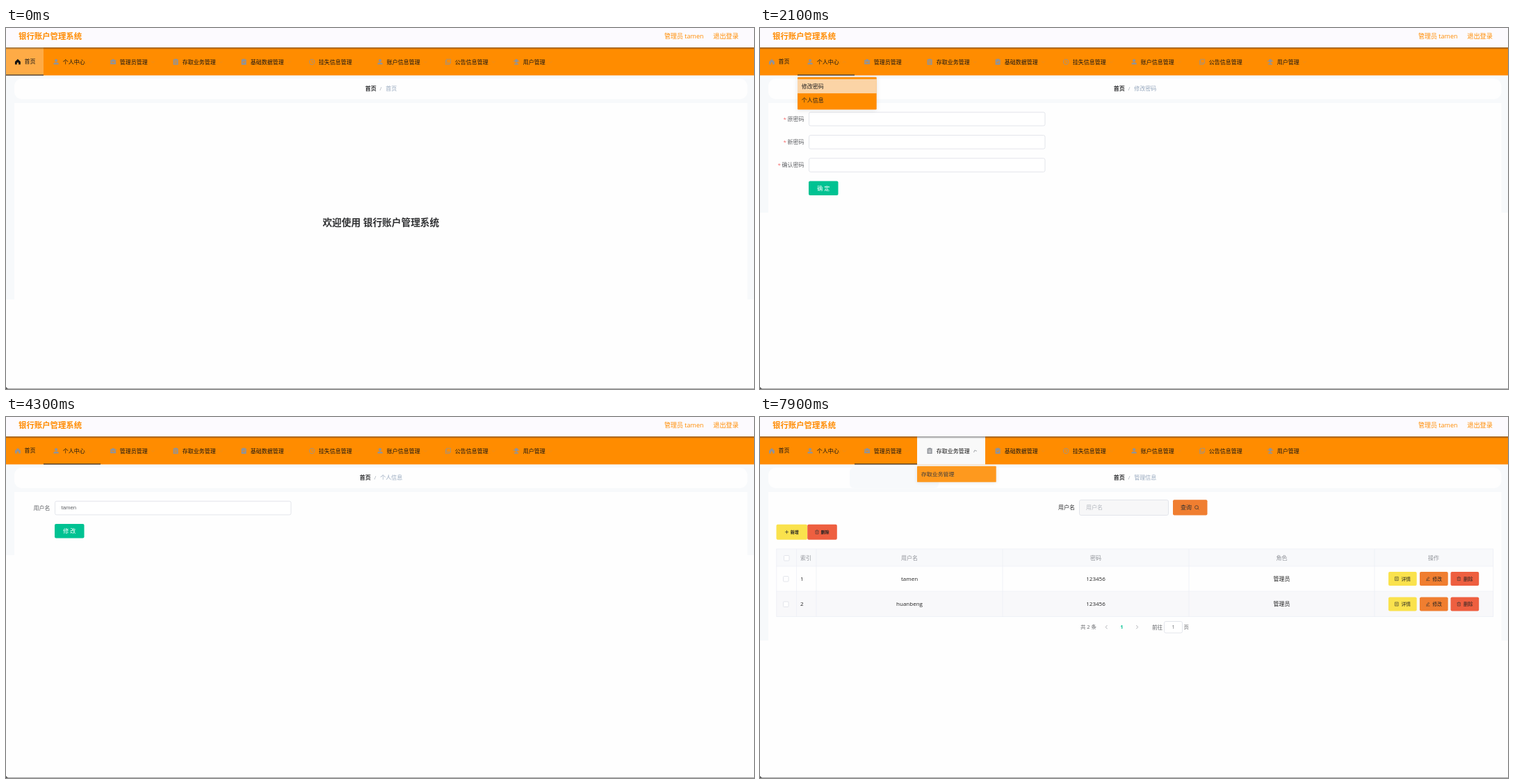
Write an HTML page that moves like this. It is 1076 px wide and 520 px high and loops after 8000 ms.

```html
<!DOCTYPE html>
<html lang="zh">
<head>
<meta charset="utf-8">
<style>
html, body { margin: 0; width: 100%; height: 100%; overflow: hidden; background: #fefefe; }
svg { display: block; width: 100%; height: 100%; }
text { font-family: "Open Sans", "Noto Sans CJK SC", "Noto Sans CJK", sans-serif; white-space: pre; }
</style>
</head>
<body>
<svg id="stage" viewBox="0 0 1076 520"></svg>
<script>
const LOOP = 8000, STEP = 100;
const ORANGE = '#ff8c00', GREEN = '#00c292', GREY = '#909399', LINE = '#dcdfe6', PALE = '#f8f9fb';
const YELLOW = '#fae24d', AMBER = '#f07e30', RED = '#ee5f40';
const USER = 'tamen', STAFF = 'huanbeng';

const clamp = v => Math.max(0, Math.min(1, v));
// rises from a over d ms, falls from b over e ms
const fade = (t, a, b, d = 300, e = d) => clamp(Math.min((t - a) / d, 1 - (t - b) / e));

const rect = (x, y, w, h, fill, r = 0, more = '') =>
  `<rect x="${x}" y="${y}" width="${w}" height="${h}" rx="${r}" fill="${fill}" ${more}/>`;
const box = (x, y, w, h, r = 2.3, fill = '#fff', line = LINE) =>
  rect(x + .5, y + .5, w - 1, h - 1, fill, r, `stroke="${line}" stroke-width=".8"`);
const stroke = (d, color, w = .8, more = '') =>
  `<path d="${d}" fill="none" stroke="${color}" stroke-width="${w}" ${more}/>`;
// y is the middle of the line
const text = (x, y, s, fill = '#606266', size = 8, anchor = 'start', more = '') =>
  `<text x="${x}" y="${y + size * .37}" font-size="${size}" fill="${fill}" text-anchor="${anchor}" ${more}>${s}</text>`;
const mid = (x, y, s, fill, size, more) => text(x, y, s, fill, size, 'middle', more);
const button = (x, y, w, h, fill, s, r = 2) => rect(x, y, w, h, fill, r) + mid(x + w / 2, y + h / 2, s, '#fff', 8);

// icons on a 10 x 10 grid
const PERSON = 'M5 .5a2.3 2.3 0 0 1 0 4.8a2.3 2.3 0 0 1 0-4.8M.8 9.2V8Q1 6 3 6H7Q9 6 9.2 8V9.2Z';
const ICONS = {
  home: 'M5 .5L9.5 4.6V9.3H6.3V6H3.7V9.3H.5V4.6Z',
  person: PERSON,
  bag: 'M3 2.2V.8H7V2.2H9.6V5H.4V2.2ZM.4 5.6H4V6.6H6V5.6H9.6V9H.4Z',
  clip: 'M1 1H3V.2H7V1H9V9.7H1ZM2.7 3.3V4.1H7.3V3.3ZM2.7 5.3V6.1H7.3V5.3ZM2.7 7.3V8H7.3V7.3Z',
  check: 'M1 1H3V.2H7V1H9V9.7H1ZM2.8 5.2L4.6 7.2L7.6 4L7 3.4L4.6 5.9L3.4 4.6Z',
  clock: 'M5 .3a4.7 4.7 0 0 1 0 9.4a4.7 4.7 0 0 1 0-9.4M5 1.2a3.8 3.8 0 0 0 0 7.6a3.8 3.8 0 0 0 0-7.6M4.6 2.3H5.4V4.8L7.2 6L6.8 6.7L4.6 5.3Z',
  note: 'M2 .5H9.5V7.5H7.5V9.5H.5V2.5H2ZM2.8 1.3V6.7H8.7V1.3ZM1.3 3.3V8.7H6.7V7.5H2V3.3Z',
  agent: 'M2.2 2Q5-1 7.8 2V4.5Q5 8 2.2 4.5ZM.6 3H1.7V5H.6ZM8.3 3H9.4V5H8.3ZM1.4 9.4Q2 6.3 5 7Q8 6.3 8.6 9.4Z'
};
const icon = (name, x, y, fill) =>
  `<path transform="translate(${x} ${y}) scale(.88)" fill-rule="evenodd" fill="${fill}" d="${ICONS[name]}"/>`;

// label, icon, left edge, width
const MENU = [
  ['首页', 'home', 0, 54], ['个人中心', 'person', 54, 82], ['管理员管理', 'bag', 136, 90],
  ['存取业务管理', 'clip', 226, 98], ['基础数据管理', 'check', 324, 98], ['挂失信息管理', 'clock', 422, 98],
  ['账户信息管理', 'person', 520, 98], ['公告信息管理', 'note', 618, 98], ['用户管理', 'agent', 716, 82]
];

function header(t, active, hovers, opens) {
  let s = rect(0, 0, 1076, 28, '#fcfafe') +
    text(18, 12, '银行账户管理系统', ORANGE, 11.4, 'start', 'font-weight="700"') +
    text(1003.5, 12, '管理员 ' + USER, ORANGE, 9, 'end') + text(1054, 12, '退出登录', ORANGE, 9.2, 'end') +
    rect(0, 28, 1076, 40.3, ORANGE);
  MENU.forEach(([label, pic, x, w], i) => {
    const on = hovers[i] || 0, first = i === 0;
    if (on) s += rect(x, 28, w, 40.3, '#f9f9f9', 0, `opacity="${on}"`);
    s += icon(pic, x + (first ? 12.5 : 13.7), 44.4, first && active === 0 ? '#111' : GREY) +
      text(x + (first ? 26.5 : 27.7), first ? 48.2 : 49.3, label, '#161616');
    if (!first) s += stroke('M-2.4-1.2L0 1.2L2.4-1.2', GREY, .8,
      `opacity="${on ? .9 : .2}" transform="translate(${x + w - 14.7} 49) rotate(${180 * (opens[i] || 0)})"`);
    if (i === active) s += rect(x, 67.2, w, 1.2, '#303133');
  });
  [.45, .25, .1].forEach((o, i) => s += rect(0, 28 + i, 1076, 1, '#222', 0, `opacity="${o}"`));
  return s;
}

function dropdown(x, open, items) {
  if (!open) return '';
  let s = rect(0, 0, 113.7, 5.8 + 20.5 * items.length, ORANGE, 1,
    'style="filter:drop-shadow(0 1px 3px rgba(0,0,0,.1))"');
  items.forEach(([label, on], i) => {
    const y = 2.9 + 20.5 * i;
    if (on) s += rect(0, y, 113.7, 20.5, '#f9f9f9', 0, `opacity="${on}"`);
    s += text(5.7, y + 10.1, label, '#222');
  });
  return `<g transform="translate(${x} 70.7) scale(1 ${open})" opacity="${open}">${s}</g>`;
}

function frame(height, crumb) {
  const half = (22 + 8 * crumb.length - .5) / 2 + 4;
  const x = 539.3 - half + .2;
  return rect(0, 68, 1076, height - 68, '#f7f9fb') + rect(12, 73, 1054.5, 29.5, '#fefefe', 11) +
    rect(12, 108, 1054.5, height - 108, '#fefefe') +
    text(x, 87.5, '首页', '#303133', 8, 'start', 'font-weight="700"') +
    mid(x + 22.3, 87.5, '/', '#a5abb5', 8) + text(x + 29.5, 87.5, crumb, '#97a8be');
}

const label = (right, y, s, need) => text(right, y, s, '#606266', 8, 'end') +
  (need ? text(right - 8 * s.length - 6, y + .5, '*', '#f56c6c') : '');

const home = () => frame(391, '首页') +
  mid(539.3, 280, '欢迎使用 银行账户管理系统', '#303133', 13.7, 'font-weight="700"');

const password = () => frame(266, '修改密码') +
  ['原密码', '新密码', '确认密码'].map((s, i) =>
    label(63.5, 130.6 + 33.2 * i, s, true) + box(70, 120.8 + 33.2 * i, 340.5, 20.6)).join('') +
  button(70, 220.4, 42.5, 20.6, GREEN, '确 定');

const profile = () => frame(199, '个人信息') + label(63.5, 130.6, '用户名') +
  box(70, 120.8, 340.5, 20.6) +
  text(79.5, 130.6, USER, '#606266', 7.8, 'start', 'style="font-family:Liberation Sans,sans-serif"') +
  button(70, 154, 42.5, 20.6, GREEN, '修 改');

const menuTrace = () => rect(129, 73, 128, 29.5, '#f7f9fb', 6);

const form = () => frame(322, '管理信息') + menuTrace() +
  rect(459.5, 119, 128, 23, PALE) + rect(594, 119, 50, 23, PALE) + rect(24, 154, 41, 23, PALE) +
  rect(24, 190, 1031, 25, PALE) + rect(24, 251, 1031, 37, PALE) +
  [904, 949, 993.5].map(x => rect(x, 223, 40.5, 20, PALE)).join('') +
  label(57.5, 127.6, '用户名', true) + box(64.5, 114.5, 340.5, 26.5, 8) + text(73.5, 127.6, '用户名', '#b4b8bf') +
  label(578, 127.6, '密码', true) + box(584.5, 114.5, 340.5, 26.5, 8) + text(593.5, 127.6, '密码', '#b4b8bf') +
  button(64.5, 153, 34.5, 26, ORANGE, '提交', 8) + button(104, 153, 34.5, 26, '#ff4500', '取消', 8);

const bin = (x, y) => stroke(`M${x - 2.6} ${y - 1.8}h5.2M${x - 1} ${y - 2.7}h2M${x - 2} ${y - 1.8}v4.4h4v-4.4M${x} ${y - .6}v2`, '#333', .6);
const sheet = (x, y) => stroke(`M${x - 2.4} ${y - 2.6}h4.8v5.2h-4.8zM${x - 1.2} ${y - .9}h2.4M${x - 1.2} ${y + .8}h2.4`, '#333', .6);
const pen = (x, y) => stroke(`M${x - 2} ${y + 1}L${x + .8} ${y - 2.4}L${x + 2} ${y - 1.4}L${x - .8} ${y + 1.8}zM${x - 2.8} ${y + 2.6}h5.6`, '#333', .6);
const ACTIONS = [[904, YELLOW, '详情', sheet], [949, AMBER, '修改', pen], [993.5, RED, '删除', bin]];

function list(loaded) {
  let s = frame(loaded ? 322 : 281, '管理信息') + menuTrace() +
    text(429, 130.3, '用户名', '#303133') + box(459, 119, 129, 23, 2.3, '#f7f7f8') + text(469, 130.3, '用户名', '#b4b8bf') +
    rect(594, 119.3, 49.5, 22.3, AMBER, 2) + text(605, 130.3, '查询', '#333') +
    stroke('M628 127.6a2.5 2.5 0 0 1 0 5a2.5 2.5 0 0 1 0-5M629.8 131.9l1.5 1.5', '#333', .7) +
    rect(23.5, 154.7, 44.5, 22, YELLOW, 2) + stroke('M36 165.7h5M38.5 163.2v5', '#333', .7) +
    text(43.7, 165.7, '新增', '#222', 6, 'start', 'font-weight="600"') +
    rect(68.2, 154.7, 42.6, 22, RED, 2) + bin(82, 165.7) +
    text(87.5, 165.7, '删除', '#222', 6, 'start', 'font-weight="600"') +
    rect(23.5, 190, 1031.5, 25, PALE) + box(34, 199, 8.5, 8.5, 1) + text(58, 202.7, '索引', GREY) +
    [[215, '用户名'], [483, '密码'], [750.5, '角色'], [969, '操作']].map(([x, h]) => mid(x, 202.7, h, GREY, 8)).join('');
  const bottom = loaded ? 287.5 : 215;
  if (loaded) {
    s += rect(23.5, 251, 1031.5, 36.5, '#f8f8fa');
    [USER, STAFF].forEach((name, i) => {
      const y = 233 + 36.5 * i;
      s += box(33, y - 4, 8.5, 8.5, 1) + text(58, y, i + 1, '#222') + mid(215, y, name, '#222', 8) +
        mid(483, y, '123456', '#222', 8) + mid(750.5, y, '管理员', '#222', 8);
      ACTIONS.forEach(([x, fill, label, pic]) =>
        s += rect(x, y - 10, 40.7, 20, fill, 2) + pic(x + 11.8, y) + text(x + 18.5, y, label, '#222', 6.8));
    });
    s += text(461, 302.7, '共 2 条', '#606266', 7.4) +
      stroke('M499.5 300l-2.3 2.6l2.3 2.6M541.3 300l2.3 2.6l-2.3 2.6', GREY, .7) +
      mid(520.3, 302.7, '1', GREEN, 7.4, 'font-weight="700"') + text(564, 302.7, '前往', '#606266', 7.6) +
      box(581, 294, 27, 17.5) + mid(594.5, 302.7, '1', '#606266', 7.4) + text(609.5, 302.7, '页', '#606266', 7.4);
  }
  const rows = [190, 215, 251, 287.5].filter(y => y <= bottom).map(y => `M23.5 ${y}H1055`).join('');
  const cols = [23.8, 52.5, 81, 349, 617, 884, 1054.7].map(x => `M${x} 190V${bottom}`).join('');
  return s + stroke(rows + cols, '#ebeef5', .7);
}

function render(t) {
  const page = t < 2100 ? home() : t < 3100 ? password() : t < 5300 ? profile() :
    t >= 6400 && t < 7300 ? form() : list(t >= 5500);
  const active = t < 2100 ? 0 : t < 5300 ? 1 : 2;
  const hovers = [
    t < 100 ? .28 : 0,
    Math.max(fade(t, 400, 800, 300, 100), fade(t, 1000, 1525), fade(t, 2200, 2560)),
    Math.max(fade(t, 3800, 4000), fade(t, 4500, 5100)),
    fade(t, 7500, LOOP)
  ];
  const opens = [0,
    Math.max(fade(t, 1470, 2100), fade(t, 2400, 3300)),
    fade(t, 4750, 5250),
    fade(t, 7636, LOOP)
  ];
  return rect(0, 0, 1076, 520, '#fefefe') + page + header(t, active, hovers, opens) +
    dropdown(54, opens[1], [
      ['修改密码', Math.max(fade(t, 1600, 2000), fade(t, 2600, 2700))],
      ['个人信息', fade(t, 2700, 3200)]
    ]) +
    dropdown(136, opens[2], [['管理员管理', fade(t, 5100, 5300, 200)]]) +
    dropdown(226, opens[3], [['存取业务管理', 0]]) +
    rect(0, 519, 1076, 1, '#a8a8a8') + '<path d="M0 517L3 520H0Z" fill="#555"/>';
}

const stage = document.getElementById('stage');
let start, last = -1;
function tick(now) {
  start ??= now;
  const t = Math.floor((now - start) % LOOP / STEP) * STEP;
  if (t !== last) stage.innerHTML = render(last = t);
  requestAnimationFrame(tick);
}
requestAnimationFrame(tick);
</script>
</body>
</html>
```
